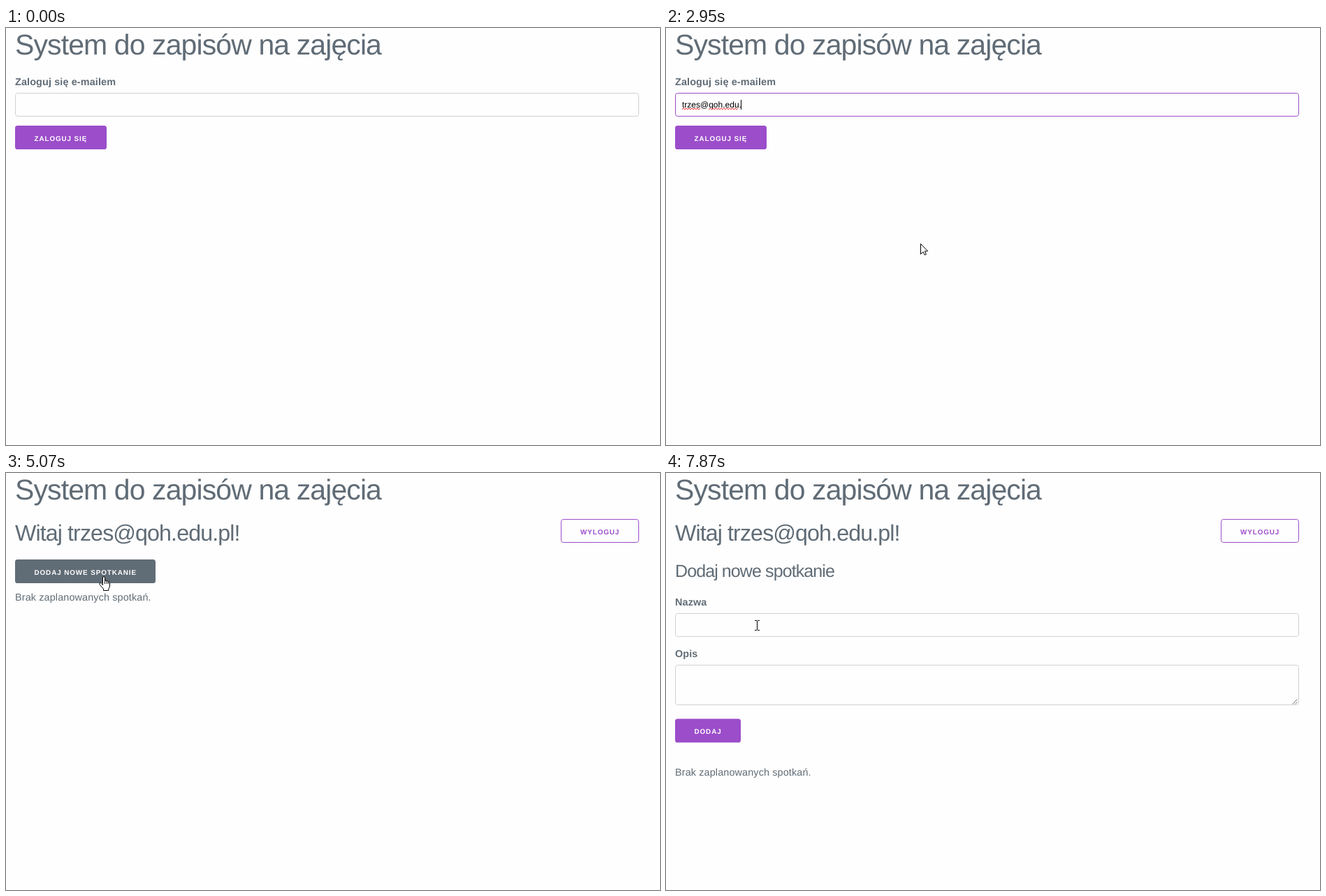
These frames come from a looping animation (936x598 px, 8 s). An HTML page:

```html
<!DOCTYPE html>
<html lang="pl">
<head>
<meta charset="utf-8">
<title>Zapisy</title>
<style>
  html, body { margin: 0; width: 100%; height: 100%; overflow: hidden; background: #fefefe; }
  svg { display: block; width: 936px; height: 598px; }
  text { font: 14.4px "Liberation Sans", Arial, sans-serif; letter-spacing: .13px; fill: #606c76;
         text-rendering: geometricPrecision; white-space: pre; }
  .h1 { font-size: 41px; letter-spacing: -.9px; }
  .h2 { font-size: 32.2px; letter-spacing: -.9px; }
  .h3 { font-size: 25px; letter-spacing: -.9px; }
  .label { font-weight: bold; }
  .caps { font-size: 9.9px; font-weight: bold; letter-spacing: .9px; fill: #fff; }
  .typed { font-size: 12px; letter-spacing: 0; fill: #000; }
  .button { fill: #9b4dca; }
  .button.hover { fill: #606c76; }
  .field { fill: none; stroke: #d1d1d1; }
  .field.focus, .outline { fill: none; stroke: #9b4dca; }
  .purple { fill: #9b4dca; }
  .squiggle { fill: none; stroke: #f00; stroke-width: .9; }
  .pointer { fill: #fff; stroke: #000; stroke-linejoin: round; }
</style>
</head>
<body>
<svg viewBox="0 0 936 598">
  <text class="h1" x="13" y="38">System do zapisów na zajęcia</text>

  <g id="login">
    <text class="label" x="13" y="82">Zaloguj się e-mailem</text>
    <rect id="email" class="field" x="13.5" y="93.5" width="892" height="33" rx="3.2"/>
    <text id="typed" class="typed" x="23" y="114"></text>
    <path id="squiggle" class="squiggle"/>
    <rect id="caret" y="103" width="1" height="14"/>
    <rect id="loginButton" class="button" x="13" y="140" width="131" height="34" rx="3.6"/>
    <text class="caps" x="40.5" y="161.5">ZALOGUJ SIĘ</text>
  </g>

  <g id="welcome">
    <text id="greeting" class="h2" x="13" y="97"></text>
    <rect class="outline" x="794.5" y="66.5" width="111" height="33" rx="3.2"/>
    <text class="caps purple" x="822" y="87.5">WYLOGUJ</text>
  </g>

  <g id="list">
    <rect id="addButton" class="button" x="13" y="124" width="201" height="34" rx="3.6"/>
    <text class="caps" x="40.5" y="145.5">DODAJ NOWE SPOTKANIE</text>
    <text x="13" y="183">Brak zaplanowanych spotkań.</text>
  </g>

  <g id="form">
    <text class="h3" x="13" y="149">Dodaj nowe spotkanie</text>
    <text class="label" x="13" y="190">Nazwa</text>
    <rect class="field" x="13.5" y="201.5" width="892" height="33" rx="3.2"/>
    <text class="label" x="13" y="264">Opis</text>
    <rect class="field" x="13.5" y="275.5" width="892" height="57" rx="3.2"/>
    <path d="M896.5 331.5l7-7M900.5 331.5l3-3" stroke="#777"/>
    <rect class="button" x="13" y="352.5" width="94" height="34" rx="3.6"/>
    <text class="caps" x="40.5" y="374">DODAJ</text>
    <text x="13" y="434">Brak zaplanowanych spotkań.</text>
  </g>

  <g id="cursor">
    <path id="arrow" class="pointer" d="M.5 .5V15.3L4 12 6.2 16.5 8.4 15.5 6.3 11H10.6Z"/>
    <path id="hand" class="pointer" transform="translate(-6)"
      d="M5.5 12.5V2Q5.5.5 7 .5T8.5 2V7.5Q8.7 6 10 6T11.3 8Q11.5 6.7 12.6 6.8T13.7 8.8Q14 7.7 14.9 8T15.5 9.5V14Q15.5 16 13.8 18V20.5H6.5V18.2L1 11.8Q.2 10.5 1.2 9.8T3.3 10.3ZM8.5 7.5V11M11.3 8V11M13.7 8.8V11"/>
    <path id="beam" transform="translate(-3 -7)" fill="none" stroke="#000"
      d="M0 .5H3M4 .5H7M3.5 1V14M0 14.5H3M4 14.5H7"/>
  </g>
</svg>
<script>
const LOOP = 8000;
const EMAIL = 'trzes@qoh.edu.pl';
const FOCUS = 830, CARET_OFF = 3690, BLUR = 4230, WELCOME = 4440, FORM = 7330;

// [time, characters typed]
const typing = [
  [0, 0], [1260, 1], [1470, 3], [1680, 4], [1770, 5], [2100, 6], [2310, 7], [2420, 8],
  [2530, 10], [2640, 11], [2840, 13], [2950, 14], [3060, 15], [3170, 16]
];

// [time, shape, hotspot x, hotspot y]
const moves = [
  [0, '', 0, 0], [210, 'arrow', 447, 237],
  [430, 'arrow', 438, 221], [520, 'arrow', 402, 148], [620, 'beam', 384, 111],
  [940, 'arrow', 373, 232], [1050, 'arrow', 364, 309],
  [3590, 'arrow', 335, 290], [3690, 'arrow', 235, 222], [3800, 'hand', 132, 160], [3900, 'hand', 104, 148],
  [4870, 'hand', 109, 146], [4970, 'hand', 126, 146], [5070, 'hand', 139, 148],
  [5940, 'arrow', 195, 235], [6040, 'arrow', 245, 312],
  [6370, 'arrow', 231, 286], [6480, 'arrow', 188, 205], [6590, 'hand', 156, 149], [6690, 'hand', 148, 137],
  [7330, 'beam', 150, 137], [7660, 'beam', 147, 153], [7770, 'beam', 136, 198], [7870, 'beam', 130, 218]
];

const $ = id => document.getElementById(id);
const show = (id, on) => { $(id).style.display = on ? '' : 'none'; };
const stepAt = (table, t) => table.findLast(step => step[0] <= t);

$('greeting').textContent = `Witaj ${EMAIL}!`;

function wave(x, end) {
  let d = `M${x} 116.8`;
  for (let i = 1; x + 2 * i <= end; i++) d += `L${x + 2 * i} ${i % 2 ? 115 : 116.8}`;
  return d;
}

function misspelled(count) {
  const words = [];
  if (count >= 6) words.push([0, 5]);
  if (count >= 10) words.push([6, count >= 14 ? 13 : 9]);
  return words;
}

function drawEmail(t) {
  const count = stepAt(typing, t)[1];
  const focused = t >= FOCUS && t < BLUR;
  const typed = $('typed');
  typed.textContent = EMAIL.slice(0, count);
  const edge = n => 23 + (n ? typed.getSubStringLength(0, n) : 0);
  $('email').classList.toggle('focus', focused);
  $('caret').setAttribute('x', Math.floor(edge(count)));
  show('caret', focused && t < CARET_OFF);
  $('squiggle').setAttribute('d', focused
    ? misspelled(count).map(([a, b]) => wave(edge(a), edge(b))).join('') : '');
}

function drawCursor(t) {
  const [, shape, x, y] = stepAt(moves, t);
  for (const id of ['arrow', 'hand', 'beam']) show(id, id === shape);
  $('cursor').setAttribute('transform', `translate(${x} ${y})`);
  for (const id of ['loginButton', 'addButton']) $(id).classList.toggle('hover', shape === 'hand');
}

function draw(t) {
  show('login', t < WELCOME);
  show('welcome', t >= WELCOME);
  show('list', t >= WELCOME && t < FORM);
  show('form', t >= FORM);
  if (t < WELCOME) drawEmail(t);
  drawCursor(t);
}

const start = performance.now();
function tick() {
  draw((performance.now() - start) % LOOP);
  requestAnimationFrame(tick);
}
tick();
</script>
</body>
</html>
```
